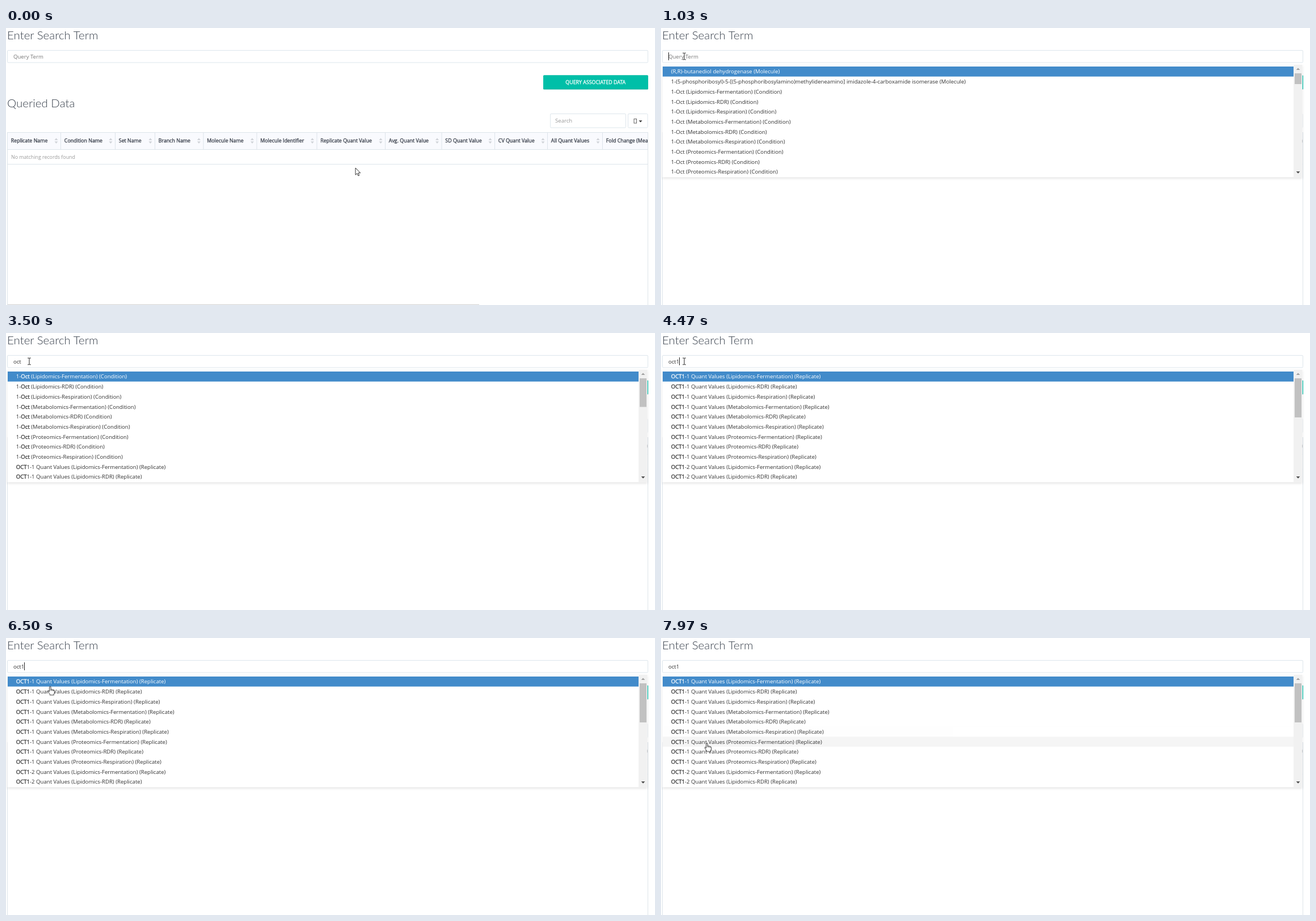
An HTML page that plays this animation: 1144 px wide and 489 px high, repeating every 8 s.

```html
<!DOCTYPE html>
<html lang="en">
<head>
<meta charset="utf-8">
<title>Query associated data</title>
<style>
html, body { margin: 0; width: 100%; height: 100%; overflow: hidden; background: #fff; }
svg { display: block; width: 1144px; height: 489px; font-family: "Open Sans", sans-serif; }
text { font-size: 9.61px; fill: currentColor; color: #333; white-space: pre; }
.title { font-family: Lato, sans-serif; font-weight: 300; font-size: 20.5px; color: #38404c; }
.small { font-size: 8.86px; }
.bold { stroke: currentColor; stroke-width: .32px; }
.hint { color: #777; }
.pale { color: #999; }
.box { fill: #fff; stroke: #dde6ec; }
.line { stroke: #dde4ea; }
.menu { filter: drop-shadow(0 2px 2px rgba(0, 0, 0, .11)); }
.timed { visibility: hidden; }

#pointer { animation: move 8s linear infinite; }
@keyframes move {
  0% { transform: translate(616px, 247px); }
  .375% { transform: translate(616px, 247px); animation-timing-function: cubic-bezier(.4, 0, .3, 1); }
  7% { transform: translate(13px, 52px); animation-timing-function: ease-in-out; }
  9.625%, 70.36% { transform: translate(41px, 50px); }
  70.375% { transform: translate(43px, 50px); animation-timing-function: ease-in-out; }
  80%, 80.875% { transform: translate(78px, 84px); animation-timing-function: ease-out; }
  84.625%, 90.375% { transform: translate(77px, 94px); }
  92.125% { transform: translate(77px, 103.5px); }
  93.375% { transform: translate(77px, 118px); }
  97.875% { transform: translate(80.5px, 174px); }
  99.625%, 100% { transform: translate(81px, 185.5px); }
}
</style>
</head>
<body>
<svg id="stage" viewBox="0 0 1144 489" xmlns="http://www.w3.org/2000/svg">
  <defs><clipPath id="tableClip"><rect x="2" y="184" width="1129" height="305"/></clipPath></defs>

  <text class="title" x="2" y="20">Enter Search Term</text>
  <rect class="box" x="2.5" y="39.5" width="1129" height="21.5" rx="1.5"/>

  <rect x="947" y="83.5" width="185" height="25" rx="1.5" fill="#00a994"/>
  <rect x="947" y="83.5" width="185" height="24.2" rx="1.5" fill="#00bfa8"/>
  <text class="small bold" x="1039.3" y="99.3" text-anchor="middle" style="color:#fff">QUERY ASSOCIATED DATA</text>

  <text class="title" x="2" y="140">Queried Data</text>
  <rect class="box" x="959.5" y="151.5" width="133" height="24.5" rx="1.5"/>
  <text class="pale" x="968" y="167.3">Search</text>
  <rect class="box" x="1096.5" y="151.5" width="34.5" height="24.5" rx="1.5"/>
  <rect x="1107" y="160.5" width="4.5" height="7.5" fill="none" stroke="#555" stroke-width=".9"/>
  <path d="M1115.5 163.3h6l-3 3.2z" fill="#333"/>

  <g id="table" clip-path="url(#tableClip)">
    <rect x="2" y="184" width="1130" height="30.5" fill="#f9fafe"/>
    <path class="line" d="M2 184.5H1132M2 214.5H1132M2 240.5H1132" fill="none"/>
    <text class="small pale" x="9" y="231">No matching records found</text>
  </g>
  <path class="line" d="M2.5 184V489M1131.5 184V489"/>

  <g id="field"></g>
  <g id="menu"></g>

  <g id="pointer">
    <path id="arrow" d="M0 0V12.3L2.9 9.6L4.8 13.9L6.7 13.1L4.8 8.9H8.7Z" fill="#fff" stroke="#000" stroke-width=".8"/>
    <path id="beam" d="M-2.8-5.8H-.7L0-5.2L.7-5.8H2.8M0-5.2V5.2M-2.8 5.8H-.7L0 5.2L.7 5.8H2.8" fill="none" stroke="#222" stroke-width="1"/>
    <g id="hand" stroke="#000" stroke-width=".8">
      <path fill="#fff" d="M-1.3 .9Q-1.2 0 0 0Q1.2 0 1.2 .9V5.2Q2.4 4.6 3.4 5.6Q4.6 5.1 5.5 6.2Q7.6 6 7.6 8V10.5Q7.6 12 6.5 13.2V15H-.6V13.4Q-2 11.8-3.6 8.9Q-4.4 7.4-3.3 7.2Q-2.3 7.1-1.3 8.8Z"/>
      <path fill="none" d="M1.2 5.2V7.4M3.4 5.6V7.6M5.5 6.2V7.8"/>
    </g>
  </g>
</svg>

<script>
const LOOP = 8000, ROW = 17.7, TOP = 68, FADE = 200;
const $ = id => document.getElementById(id);
const pct = ms => +(ms / LOOP * 100).toFixed(4) + '%';
const rules = [];
let count = 0;

const keyframes = (frames, timing) => {
  const name = 'k' + count++;
  rules.push(`@keyframes ${name}{${frames.map(([ms, css]) => `${pct(ms)}{${css}}`).join('')}}`);
  return `animation:${name} ${LOOP}ms ${timing} infinite`;
};

// Style that shows an element only within the given [from, to] spans.
const during = (...spans) => {
  const frames = [];
  if (spans[0][0] > 0) frames.push([0, 'visibility:hidden']);
  for (const [from, to] of spans) {
    frames.push([from, 'visibility:visible']);
    frames.push([to, to < LOOP ? 'visibility:hidden' : 'visibility:visible']);
  }
  if (frames.at(-1)[0] < LOOP) frames.push([LOOP, 'visibility:hidden']);
  return keyframes(frames, 'step-end');
};
const timed = (body, ...spans) => `<g class="timed" style="${during(...spans)}">${body}</g>`;
const add = (id, html) => $(id).insertAdjacentHTML('beforeend', html);

// Table header: label and right edge of each column
const columns = [
  ['Replicate Name', 96.5], ['Condition Name', 192.5], ['Set Name', 262.5],
  ['Branch Name', 348], ['Molecule Name', 442], ['Molecule Identifier', 548],
  ['Replicate Quant Value', 668.5], ['Avg. Quant Value', 768], ['SD Quant Value', 861.5],
  ['CV Quant Value', 954.5], ['All Quant Values', 1051.5], ['Fold Change (Mean)', 1160]
];
let left = 2.5;
for (const [label, right] of columns) {
  add('table', `<text class="small bold" x="${left + 6.3}" y="202" style="color:#3b414c">${label}</text>
    <path class="line" d="M${right} 184V214"/>
    <path d="M${right - 11} 198h6l-3-3.8zM${right - 11} 200.2h6l-3 3.8z" fill="#d0d3d8"/>`);
  left = right;
}
// Edge of the scroll bar below the table
add('table', timed('<rect x="2" y="487.7" width="832" height="2" fill="#d9d9d9"/>', [0, 1030]));

// Text field: typed text and blinking caret
const typed = (s, from, to) => timed(`<text x="13" y="53.6">${s}</text>`, [from, to]);
const caret = (x, ...spans) => timed(`<rect x="${x}" y="43" width="1" height="14" fill="#222"/>`, ...spans);
add('field',
  timed('<text class="hint" x="13" y="53.6">Query Term</text>', [0, 1900]) +
  typed('o', 1900, 2070) + typed('oc', 2070, 2430) +
  typed('oct', 2430, 4070) + typed('oct1', 4070, LOOP) +
  caret(13, [900, 1430]) + caret(19, [1900, 2070]) + caret(23, [2070, 2430]) +
  caret(26, [2430, 2970], [3530, 4030]) +
  caret(32, [4070, 4600], [5130, 5660], [6190, 6720], [7250, 7780]));

// Suggestion lists
const sets = ['Lipidomics', 'Metabolomics', 'Proteomics'].flatMap(
  kind => ['Fermentation', 'RDR', 'Respiration'].map(mode => `${kind}-${mode}`));
const conditions = sets.map(s => `1-Oct (${s}) (Condition)`);
const replicates = n => sets.map(s => `OCT1-${n} Quant Values (${s}) (Replicate)`);
const all = [
  '(R,R)-butanediol dehydrogenase (Molecule)',
  '1-(5-phosphoribosyl)-5-[(5-phosphoribosylamino)methylideneamino] imidazole-4-carboxamide isomerase (Molecule)',
  ...conditions
];
const forOct = [...conditions, ...replicates(1)];
const forOct1 = [...replicates(1), ...replicates(2)];

const mark = (s, query) => query
  ? s.replace(new RegExp(query, 'gi'), m => `<tspan class="bold">${m}</tspan>`) : s;
const list = (items, query, from, to) => timed(items.slice(0, 11).map((s, i) =>
  `<text x="17.7" y="${(TOP + 12.4 + i * ROW).toFixed(2)}"${i ? '' : ' style="color:#fff"'}>${mark(s, query)}</text>`
).join(''), [from, to]);
const thumb = (h, from, to) =>
  timed(`<rect x="1117" y="80" width="12" height="${h}" fill="#c1c1c1"/>`, [from, to]);

// Row highlight that fades in on enter and out on leave
const hover = (row, enter, leave) => {
  const peak = Math.min(1, (leave - enter) / FADE);
  const frames = [[0, 'opacity:0'], [enter, 'opacity:0'], [Math.min(enter + FADE, leave), `opacity:${peak}`]];
  if (leave < LOOP) {
    const end = Math.min(leave + FADE, LOOP);
    frames.push([leave, `opacity:${peak}`], [end, `opacity:${(peak * (1 - (end - leave) / FADE)).toFixed(3)}`]);
    if (end < LOOP) frames.push([LOOP, 'opacity:0']);
  } else frames.push([LOOP, `opacity:${peak}`]);
  return `<rect x="3" y="${TOP + (row - 1) * ROW}" width="1112" height="${ROW}" fill="#f5f5f5" style="${keyframes(frames, 'linear')}"/>`;
};
const crossings = [6540, 7370, 7490, 7605, 7717, 7780, LOOP];
const hovers = crossings.slice(1).map((leave, i) => hover(i + 2, crossings[i], leave)).join('');

const panel = `
  <rect class="menu" x="2.5" y="65" width="1128" height="198.5" fill="#fff"/>
  <rect x="3" y="${TOP}" width="1112" height="${ROW}" fill="#428bca"/>
  <rect x="1115" y="65" width="15.5" height="198.5" fill="#f1f1f1"/>
  <path d="M1119.7 74h6.6l-3.3-3.6z" fill="#a0a0a0"/>
  <path d="M1119.7 253.2h6.6l-3.3 3.6z" fill="#444"/>`;
add('menu',
  timed(panel, [1030, LOOP]) + hovers +
  thumb(19, 1030, 2830) + thumb(50.5, 2830, 4470) + thumb(69, 4470, LOOP) +
  list(all, '', 1030, 1900) + list(all, 'o', 1900, 2070) +
  list(all, 'oc', 2070, 2430) + list(all, 'oct', 2430, 2830) +
  list(forOct, 'oct', 2830, 4070) + list(forOct, 'oct1', 4070, 4470) +
  list(forOct1, 'oct1', 4470, LOOP));

// Pointer shape
const shape = (id, from, to) => {
  $(id).classList.add('timed');
  $(id).style.cssText = during([from, to]);
};
shape('arrow', 0, 410);
shape('beam', 410, 5960);
shape('hand', 5960, LOOP);

const style = document.createElement('style');
style.textContent = rules.join('\n');
document.head.append(style);
</script>
</body>
</html>
```
